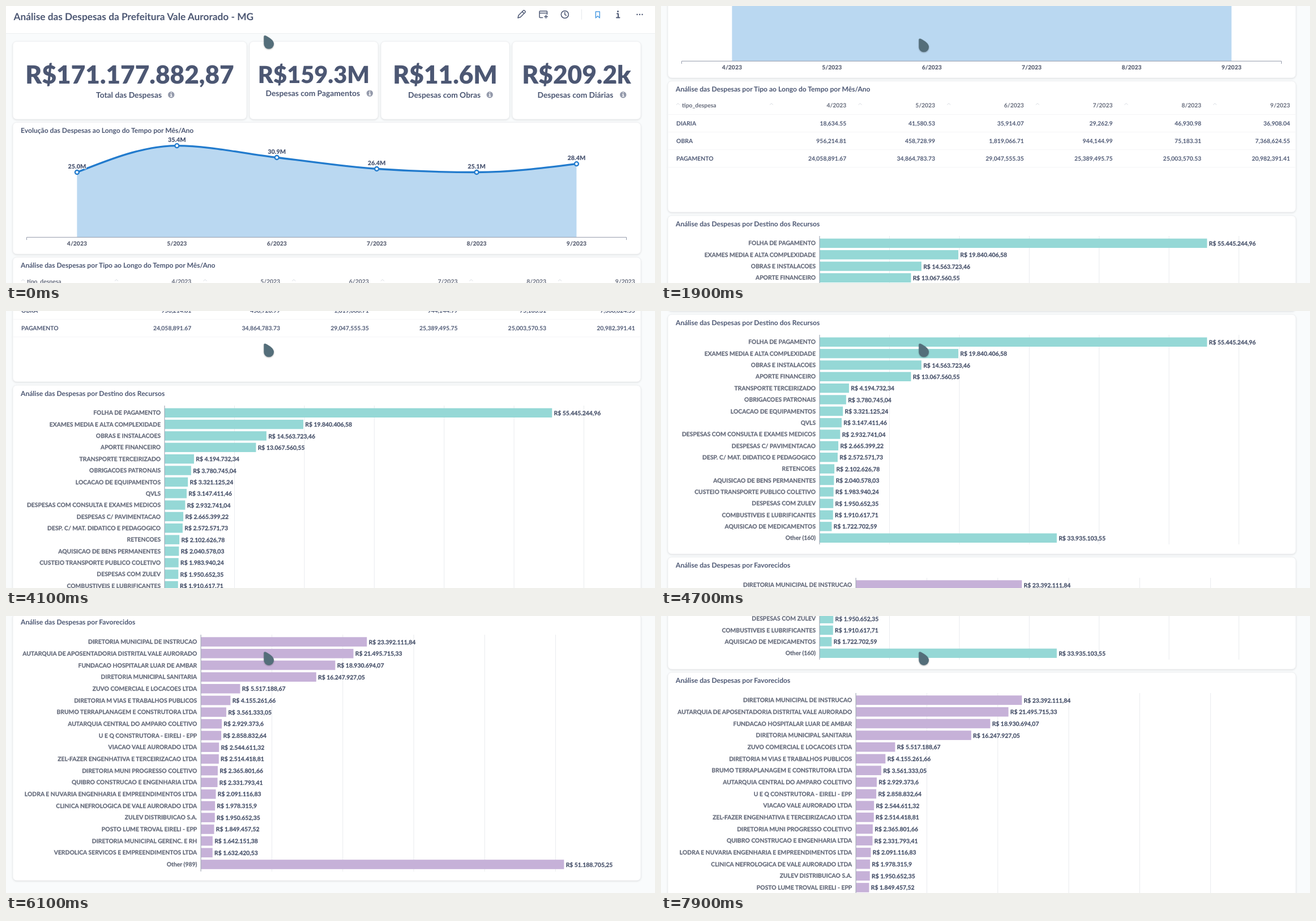
Recreate the animation shown at these times as an HTML page. Size 1146x489 px, loop 8000 ms.

```html
<!DOCTYPE html>
<html lang="pt-BR">
<head>
<meta charset="utf-8">
<title>Painel de despesas</title>
<style>
  html, body { margin: 0; width: 100%; height: 100%; overflow: hidden; background: #f9fbfc; }
  svg { display: block; width: 1146px; height: 489px; }
  text { font: 700 10.38px Lato, sans-serif; fill: #4c5773; white-space: pre; text-rendering: geometricPrecision; }
  .card { fill: #fff; stroke: #eceef0; stroke-width: .8; filter: drop-shadow(0 1px 1.5px rgba(0, 0, 0, .11)); }
  .title { font-size: 12.1px; }
  .page-title { font-size: 17.3px; }
  .big { font-weight: 900; text-anchor: middle; }
  .label { font-size: 13.84px; }
  .tick { font-weight: 900; text-anchor: middle; fill: #5f6577; }
  .point { font-size: 10.8px; font-weight: 900; text-anchor: middle; stroke: #fff; stroke-width: 2px; paint-order: stroke; }
  .head { fill: #636979; }
  .name { fill: #636979; stroke: #636979; stroke-width: .25px; }
  .value { fill: #465069; stroke: #465069; stroke-width: .25px; }
  .end { text-anchor: end; }
  .axis { fill: none; stroke: #949aab; }
  .grid { stroke: #e9ebee; }
  .row { stroke: #f4f5f7; }
  .caret { fill: none; stroke: #d3d7de; stroke-width: .9; }
  .icon { fill: none; stroke: #4c5773; stroke-width: 1.5; stroke-linejoin: round; stroke-linecap: round; }
  .curve { fill: none; stroke: #227bcd; stroke-width: 3.3; }
  .dot { fill: #fff; stroke: #227bcd; stroke-width: 2.3; }
</style>
</head>
<body>
<svg viewBox="0 0 1146 489" xmlns="http://www.w3.org/2000/svg">
  <g id="page"></g>
  <path id="cursor" d="M.3 2.600 C.3 .4 2 0 4 1 C10 4.100 18 9 18 15.400 A8.850 8.850 0 0 1 .3 15.400 Z"
        fill="#546e7a" style="filter:drop-shadow(0 1px 1px rgba(0,0,0,.3))"/>
</svg>
<script>
const text = (x, y, str, cls = '', attrs = '') => `<text x="${x}" y="${y}" class="${cls}" ${attrs}>${str}</text>`;
const path = (d, cls, attrs = '') => `<path d="${d}" class="${cls}" ${attrs}/>`;
const card = (x, top, right, bottom) =>
  `<rect class="card" x="${x}" y="${top}" width="${right - x}" height="${bottom - top}" rx="7"/>`;

function header() {
  return `<rect width="1146" height="48" fill="#fff"/>` + path('M0 48.5H1146', '', 'stroke="#eceff1"') +
    text(13.5, 24.5, 'Análise das Despesas da Prefeitura Vale Aurorado - MG', 'page-title') +
    path('M904 21l1-4.5 8.500-8.500q1-.8 2 0l1.300 1.300q.8 1 0 2l-8.500 8.500zM911.500 10l3.300 3.300', 'icon') +
    path('M947.500 20.500H943q-1 0-1-1V10q0-1 1-1h11.500q1 0 1 1v4.500M942 12.500h13.500M953.500 16v5.500M950.800 18.700h5.500', 'icon') +
    path('M980.300 15a6.500 6.500 0 1 0 13 0a6.500 6.500 0 1 0-13 0M986.800 11v4.200l2.500 1.500', 'icon') +
    path('M1016.500 6V24', '', 'stroke="#e6e9ed"') +
    path('M1041.300 10h7v11l-3.500-3.300-3.500 3.300z', 'icon', 'style="stroke:#509ee3"') +
    path('M1079 13.500h2v6.500M1078 20.500h5.500', 'icon', 'style="stroke-width:2"') +
    `<circle cx="1080.500" cy="9.500" r="1.500" fill="#4c5773"/>` +
    [1114.5, 1119, 1123.5].map(x => `<circle cx="${x}" cy="15" r="1.200" fill="#4c5773"/>`).join('');
}

function scalar({ x, right, value, size = 44.2, label, labelX, iconX, y = 161.5 }) {
  const baseline = size > 43 ? 137 : 136;
  return card(x, 62.5, right, 200) +
    text((x + right) / 2, baseline, value, 'big', `style="font-size:${size}px"`) +
    text(labelX, y, label, 'label') +
    `<circle cx="${iconX}" cy="${y - 4.700}" r="5.700" fill="#949aab"/>` +
    path(`M${iconX - 1.5} ${y - 5.500}h1.700v3.400M${iconX - 1.800} ${y - 1.900}h3.800M${iconX - .8} ${y - 8.200}h1.700`, '',
      'fill="none" stroke="#fff" stroke-width="1.500"');
}

// Monotone cubic through evenly spaced points
function smooth(xs, ys) {
  const slope = ys.slice(1).map((y, i) => y - ys[i]);
  const last = slope.length;
  const m = ys.map((_, i) => {
    const a = slope[i - 1], b = slope[i];
    if (!i || i === last || a * b <= 0) return 0;
    return 2 * Math.sign(a) * Math.min(Math.abs(a), Math.abs(b), Math.abs(a + b) / 4);
  });
  m[0] = (3 * slope[0] - m[1]) / 2;
  m[last] = (3 * slope[last - 1] - m[last - 1]) / 2;
  const third = (xs[1] - xs[0]) / 3;
  return `M${xs[0]} ${ys[0]}` + slope.map((_, i) =>
    `C${xs[i] + third} ${ys[i] + m[i] / 3} ${xs[i + 1] - third} ${ys[i + 1] - m[i + 1] / 3} ${xs[i + 1]} ${ys[i + 1]}`).join('');
}

const months = [4, 5, 6, 7, 8, 9].map(m => m + '/2023');

function lineChart() {
  const xs = months.map((_, i) => 125.4 + 176.4 * i);
  const ys = [293.5, 246.7, 267.5, 287.5, 293.5, 278.7];
  const labels = ['25.0M', '35.4M', '30.9M', '26.4M', '25.1M', '28.4M'];
  const curve = smooth(xs, ys);
  return card(12, 205.5, 1121, 438) +
    text(26, 224, 'Evolução das Despesas ao Longo do Tempo por Mês/Ano', 'title') +
    path(`${curve}V408H${xs[0]}Z`, '', 'fill="#bad8f1"') +
    path('M36.500 413V408.300H1095.500V413', 'axis') +
    path(curve, 'curve') +
    xs.map((x, i) => `<circle class="dot" cx="${x}" cy="${ys[i]}" r="3.500"/>` +
      text(x, ys[i] - 6.6, labels[i], 'point') + text(x, 423.4, months[i], 'tick')).join('');
}

function table() {
  const rows = [
    ['DIARIA', '18,634.55', '41,580.53', '35,914.07', '29,262.9', '46,930.98', '36,908.04'],
    ['OBRA', '956,214.81', '458,728.99', '1,819,066.71', '944,144.99', '75,183.31', '7,368,624.55'],
    ['PAGAMENTO', '24,058,891.67', '34,864,783.73', '29,047,555.35', '25,389,495.75', '25,003,570.53', '20,982,391.41'],
  ];
  const cells = (list, y, cls) => list.map((s, i) => text(327.4 + 156.68 * i, y, s, 'end ' + cls)).join('');
  const carets = [30, ...months.map((_, i) => 195 + 156.6 * i)];
  return card(12, 443.5, 1121, 675) +
    text(26, 461.5, 'Análise das Despesas por Tipo ao Longo do Tempo por Mês/Ano', 'title') +
    carets.map(x => path(`M${x - 3} 485.500l3-2.700 3 2.700`, 'caret')).join('') +
    text(37, 490, 'tipo_despesa', 'head') + cells(months, 490, 'head') +
    path('M12.500 502.500H1120.500', 'row') +
    rows.map(([name, ...values], i) => {
      const y = 521.7 + 31.1 * i;
      return text(27, y, name) + cells(values, y, '') + path(`M12.500 ${y + 11.900}H1120.500`, 'row');
    }).join('');
}

const money = n => 'R$ ' + n.toLocaleString('pt-BR', { maximumFractionDigits: 2 });

function barChart({ title, top, bottom, titleY, x0, perMillion, firstY, step, thick, gridTop, gridBottom, grids, color, data }) {
  let out = card(12, top, 1121, bottom) + text(26, titleY, title, 'title');
  for (let i = 1; i <= grids; i++) out += path(`M${x0 + 10 * perMillion * i} ${gridTop}V${gridBottom}`, 'grid');
  data.forEach(([name, value], i) => {
    const y = firstY + step * i, width = value / 1e6 * perMillion;
    out += `<rect x="${x0}" y="${y - thick / 2}" width="${width}" height="${thick}" fill="${color}"/>` +
      text(x0 - 7, y + 3.6, name, 'name end') + text(x0 + width + 3.3, y + 4, money(value), 'value');
  });
  return out + path(`M${x0 - .2} ${gridTop}V${gridBottom}`, 'axis');
}

const byPurpose = {
  title: 'Análise das Despesas por Destino dos Recursos',
  top: 681, bottom: 1104, titleY: 699.5, x0: 280.2, perMillion: 12.337, firstY: 729.8, step: 20.35, thick: 16.4,
  gridTop: 717, gridBottom: 1087, grids: 6, color: '#95d8d6',
  data: [
    ['FOLHA DE PAGAMENTO', 55445244.96],
    ['EXAMES MEDIA E ALTA COMPLEXIDADE', 19840406.58],
    ['OBRAS E INSTALACOES', 14563723.46],
    ['APORTE FINANCEIRO', 13067560.55],
    ['TRANSPORTE TERCEIRIZADO', 4194732.34],
    ['OBRIGACOES PATRONAIS', 3780745.04],
    ['LOCACAO DE EQUIPAMENTOS', 3321125.24],
    ['QVLS', 3147411.46],
    ['DESPESAS COM CONSULTA E EXAMES MEDICOS', 2932741.04],
    ['DESPESAS C/ PAVIMENTACAO', 2665399.22],
    ['DESP. C/ MAT. DIDATICO E PEDAGOGICO', 2572571.73],
    ['RETENCOES', 2102626.78],
    ['AQUISICAO DE BENS PERMANENTES', 2040578.03],
    ['CUSTEIO TRANSPORTE PUBLICO COLETIVO', 1983940.24],
    ['DESPESAS COM ZULEV', 1950652.35],
    ['COMBUSTIVEIS E LUBRIFICANTES', 1910617.71],
    ['AQUISICAO DE MEDICAMENTOS', 1722702.59],
    ['Other (160)', 33935103.55],
  ],
};

const byPayee = {
  title: 'Análise das Despesas por Favorecidos',
  top: 1109.5, bottom: 1580, titleY: 1127.5, x0: 344.3, perMillion: 12.523, firstY: 1158.6, step: 20.68, thick: 16.6,
  gridTop: 1146, gridBottom: 1564, grids: 5, color: '#c6b1d8',
  data: [
    ['DIRETORIA MUNICIPAL DE INSTRUCAO', 23392111.84],
    ['AUTARQUIA DE APOSENTADORIA DISTRITAL VALE AURORADO', 21495715.33],
    ['FUNDACAO HOSPITALAR LUAR DE AMBAR', 18930694.07],
    ['DIRETORIA MUNICIPAL SANITARIA', 16247927.05],
    ['ZUVO COMERCIAL E LOCACOES LTDA', 5517188.67],
    ['DIRETORIA M VIAS E TRABALHOS PUBLICOS', 4155261.66],
    ['BRUMO TERRAPLANAGEM E CONSTRUTORA LTDA', 3561333.05],
    ['AUTARQUIA CENTRAL DO AMPARO COLETIVO', 2929373.6],
    ['U E Q CONSTRUTORA - EIRELI - EPP', 2858832.64],
    ['VIACAO VALE AURORADO LTDA', 2544611.32],
    ['ZEL-FAZER ENGENHATIVA E TERCEIRIZACAO LTDA', 2514418.81],
    ['DIRETORIA MUNI PROGRESSO COLETIVO', 2365801.66],
    ['QUIBRO CONSTRUCAO E ENGENHARIA LTDA', 2331793.41],
    ['LODRA E NUVARIA ENGENHARIA E EMPREENDIMENTOS LTDA', 2091116.83],
    ['CLINICA NEFROLOGICA DE VALE AURORADO LTDA', 1978315.9],
    ['ZULEV DISTRIBUICAO S.A.', 1950652.35],
    ['POSTO LUME TROVAL EIRELI - EPP', 1849457.52],
    ['DIRETORIA MUNICIPAL GERENC. E RH', 1642151.38],
    ['VERDOLICA SERVICOS E EMPREENDIMENTOS LTDA', 1632420.53],
    ['Other (989)', 51188705.25],
  ],
};

const page = document.getElementById('page');
const cursor = document.getElementById('cursor');
page.innerHTML = header() + [
  { x: 12, right: 425, value: 'R$171.177.882,87', label: 'Total das Despesas', labelX: 159, iconX: 291.7 },
  { x: 430, right: 657, value: 'R$159.3M', size: 41.5, label: 'Despesas com Pagamentos', labelX: 458.5, iconX: 642.3, y: 158.8 },
  { x: 662, right: 889, value: 'R$11.6M', label: 'Despesas com Obras', labelX: 710, iconX: 854.2 },
  { x: 894, right: 1121, value: 'R$209.2k', label: 'Despesas com Diárias', labelX: 938.5, iconX: 1089.7 },
].map(scalar).join('') + lineChart() + table() + barChart(byPurpose) + barChart(byPayee);

// Wheel bursts: start time, then the scroll offset every 100 ms
const bursts = [
  [0, 0],
  [700, 30, 85, 104],
  [1500, 150, 245, 306, 306, 311],
  [3100, 340, 395, 440, 495, 518],
  [4100, 550, 602, 622],
  [4500, 632, 652, 675, 719, 765, 810, 829],
  [5500, 870, 911],
  [5800, 950, 1020, 1085, 1113],
  [7700, 1090, 1040, 1010],
];

function scrollAt(t) {
  const [start, ...offsets] = bursts.findLast(b => b[0] <= t);
  return offsets[Math.min(Math.floor((t - start) / 100), offsets.length - 1)];
}

const origin = performance.now();
function draw() {
  const t = (performance.now() - origin) % 8000;
  page.setAttribute('transform', `translate(0 ${-scrollAt(t)})`);
  cursor.setAttribute('transform', `translate(455 ${t < 1500 ? 51.5 : t < 5500 ? 57 : 62.7})`);
  requestAnimationFrame(draw);
}
draw();
</script>
</body>
</html>
```
